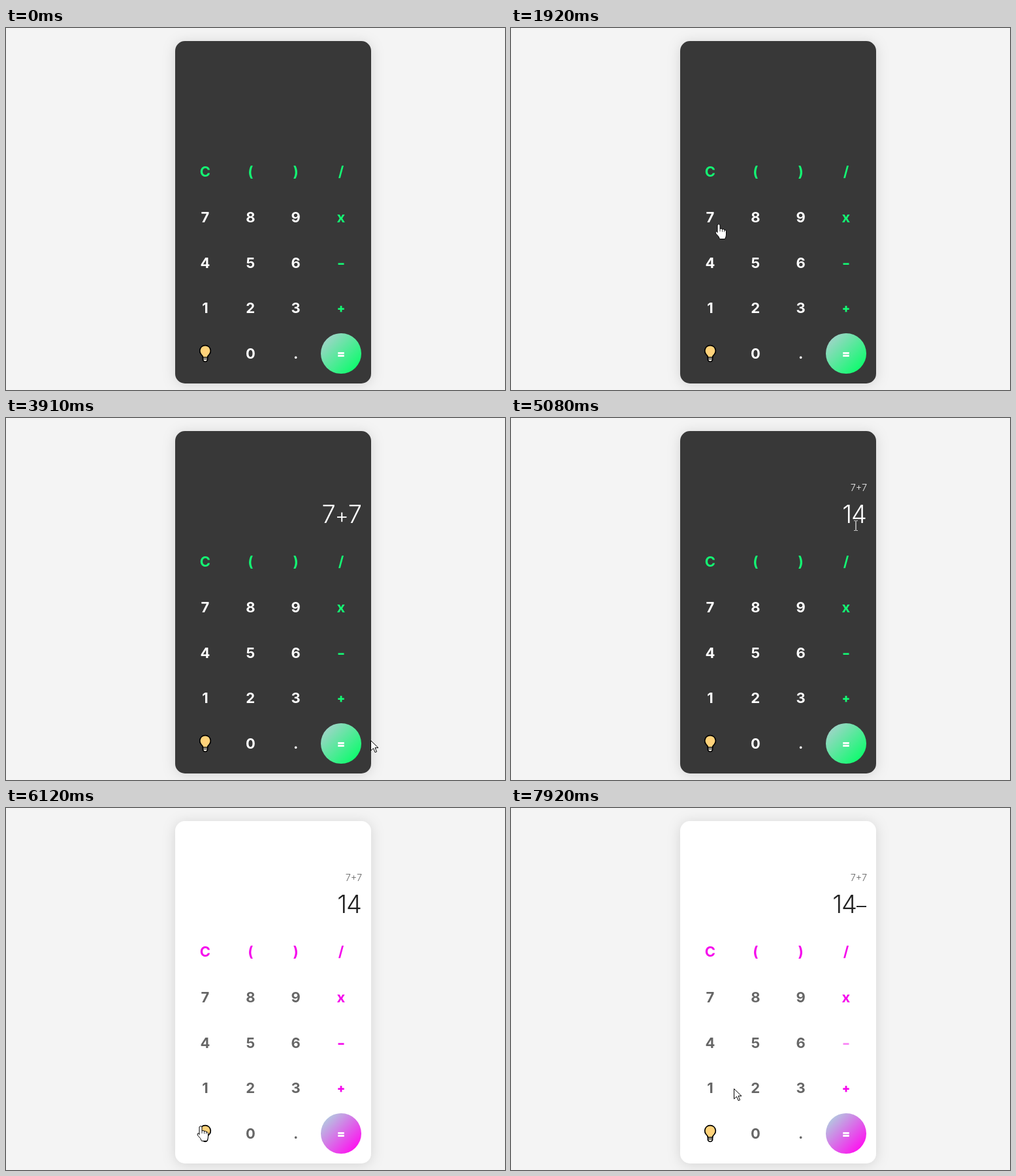
An HTML page for the animation above (7.99 s loop, 764 by 555 pixels).

```html
<!DOCTYPE html>
<html lang="en">
<head>
<meta charset="utf-8">
<title>Calculator</title>
<style>
  html, body { margin: 0; width: 100%; height: 100%; overflow: hidden; background: #f4f4f4; }
  svg {
    display: block; font-family: Inter, Roboto, sans-serif; text-anchor: middle;
    --card: #383838; --key: #fff; --op: #14f773; --from: #9fd5c8; --to: #0dfc6d;
    --big: #fff; --small: #eee;
  }
  svg.light {
    --card: #fff; --key: #666; --op: #f50aec; --from: #b3c9e0; --to: #ff10f0;
    --big: #222; --small: #666;
  }
  #card { fill: var(--card); filter: drop-shadow(0 2px 10px rgba(0, 0, 0, .13)); }
  #keys { font-size: 22px; font-weight: 700; fill: var(--key); }
  #keys .op { fill: var(--op); }
  #keys .sign { font-size: 18px; font-weight: 900; }
  #keys .eq { fill: #fff; }
  #big { font-size: 38px; font-weight: 300; letter-spacing: -1px; fill: var(--big); text-anchor: end; }
  #big tspan { font-size: 32px; }
  #small { font-size: 14.5px; font-weight: 300; fill: var(--small); text-anchor: end; }
  #from { stop-color: var(--from); }
  #to { stop-color: var(--to); }
  .pointer { fill: #fff; stroke: #000; stroke-linejoin: round; }
  #beam { fill: none; stroke: #ccc; }
</style>
</head>
<body>
<svg id="stage" width="764" height="555" viewBox="0 0 764 555">
  <defs>
    <linearGradient id="shade" x1=".12" y1=".12" x2=".88" y2=".88">
      <stop id="from" offset="0"/><stop id="to" offset="1"/>
    </linearGradient>
    <clipPath id="screen"><path d="M274 90H544V180H274z"/></clipPath>
  </defs>
  <rect id="card" x="259" y="20" width="300" height="525" rx="15"/>
  <text id="small" x="545" y="112"></text>
  <g clip-path="url(#screen)"><text id="big" x="544" y="161"></text></g>
  <g id="keys">
    <circle cx="513" cy="499" r="31" fill="url(#shade)"/>
  </g>
  <g id="bulb" stroke="#000" stroke-width="1.7">
    <path d="M301.500 504h7v5q-1 2.500-3.500 2.500t-3.500-2.500z" fill="#f2efe4"/>
    <path d="M302 507.500h6" stroke-width="1"/>
    <path d="M301.500 505q0-2-3-5a8.300 8.300 0 1 1 13 0q-3 3-3 5z" fill="#ffd27a"/>
  </g>
  <circle id="ring" cx="-1" r="12" fill="rgb(255,232,0)" fill-opacity=".5"/>
  <path id="arrow" class="pointer" d="M.5 .5V16l4-3.600 2.600 6.200 2.500-1-2.600-6H12z"/>
  <g id="hand" class="pointer">
    <path d="M-3 2q2-3 4 0v6l2-.5 2 1 1.500 0 1.500 1 1.500 .5q1 1 1 3v4q0 3-2 6.500h-8q-1-4-5.500-8-2-3 0-4 1 0 2 2z"/>
    <path d="M1 8v4M4.500 8.500v4M7.500 9.500v3" stroke-width=".8"/>
  </g>
  <path id="beam" d="M-3-7.500h2.500q.5 0 .5 1V6.500q0 1-.5 1H-3M3-7.500H.5q-.5 0-.5 1V6.500q0 1 .5 1H3"/>
</svg>
<script>
const LOOP = 7990, HOLD = 130;
const $ = id => document.getElementById(id);
const cols = [0, 1, 2, 3].map(c => 305 + c * 69.3);
const rows = [0, 1, 2, 3, 4].map(r => 220 + r * 69.8);
const layout = ["C()/", "789x", "456-", "123+", " 0.="];
const keys = {};

layout.forEach((line, r) => [...line].forEach((label, c) => {
  if (label === " ") return;
  const key = document.createElementNS("http://www.w3.org/2000/svg", "text");
  const sign = "+=-".includes(label);
  key.textContent = label === "-" ? "–" : label;
  key.setAttribute("x", cols[c]);
  key.setAttribute("y", Math.round(rows[r]) + (sign ? 6.5 : 8));
  if (sign) key.classList.add("sign");
  key.classList.toggle("eq", label === "=");
  key.classList.toggle("op", label !== "=" && (r === 0 || c === 3));
  $("keys").append(key);
  keys[label] = key;
}));

// Pointer stops; those with a key are presses, which hold before moving on.
const stops = [
  { at: 250, x: 748, y: 525 },
  { at: 520, x: 736, y: 515 },
  { at: 1290, x: 528, y: 252 },
  { at: 1920, x: 319, y: 300 },
  { at: 2060, x: 304, y: 305, key: "7" },
  { at: 2680, x: 512, y: 417, key: "+" },
  { at: 3500, x: 281, y: 296, key: "7" },
  { at: 3910, x: 558, y: 494 },
  { at: 4320, x: 541, y: 498, key: "=" },
  { at: 5080, x: 528, y: 165 },
  { at: 5210, x: 546, y: 140 },
  { at: 5990, x: 299, y: 487, key: "bulb" },
  { at: 6810, x: 372, y: 390 },
  { at: 7090, x: 514, y: 368, key: "-", fade: 900 },
  { at: 7920, x: 341, y: 430 }
];
const presses = stops.filter(s => s.key);

function pointerAt(t) {
  const i = stops.findIndex(s => s.at > t);
  if (i < 0) return stops[stops.length - 1];
  const a = stops[i - 1], b = stops[i];
  const leave = a.at + (a.key ? HOLD : 0);
  const k = Math.max(0, (t - leave) / (b.at - leave));
  const ease = k * k * (3 - 2 * k);
  return { x: a.x + (b.x - a.x) * ease, y: a.y + (b.y - a.y) * ease };
}

// Replays every press that has taken effect by time t.
function calculatorAt(t) {
  const state = { sum: "", past: "", light: false };
  for (const { at, key } of presses) {
    if (at + HOLD > t) break;
    if (key === "bulb") state.light = !state.light;
    else if (key === "=") {
      state.past = state.sum;
      state.sum = String(state.sum.split("+").reduce((total, n) => total + Number(n), 0));
    } else state.sum += key;
  }
  return state;
}

const show = (id, on) => { $(id).style.display = on ? "" : "none"; };

function drawPointer(t) {
  const visible = t >= stops[0].at;
  const { x, y } = visible ? pointerAt(t) : stops[0];
  const onKey = rows.some(r => cols.some(c => Math.hypot(x - c, y - r) <= 31));
  const onScreen = x > 274 && x < 544 && y > 95 && y < 180;
  for (const id of ["arrow", "hand", "beam", "ring"])
    $(id).setAttribute("transform", `translate(${Math.round(x)} ${Math.round(y)})`);
  show("hand", visible && onKey);
  show("beam", visible && onScreen);
  show("arrow", visible && !onKey && !onScreen);
  show("ring", presses.some(p => t >= p.at && t < p.at + HOLD));
}

function draw() {
  const t = (performance.now() - start) % LOOP;
  const { sum, past, light } = calculatorAt(t);
  $("stage").classList.toggle("light", light);
  $("small").textContent = past;
  $("big").innerHTML = sum.replace("-", "–").replace(/[+–]/g, "<tspan>$&</tspan>");
  for (const label in keys) {
    const faded = presses.some(p => p.key === label && t >= p.at && t < p.at + (p.fade || 200));
    keys[label].style.opacity = faded ? .5 : 1;
  }
  drawPointer(t);
  requestAnimationFrame(draw);
}
const start = performance.now();
draw();
</script>
</body>
</html>
```
